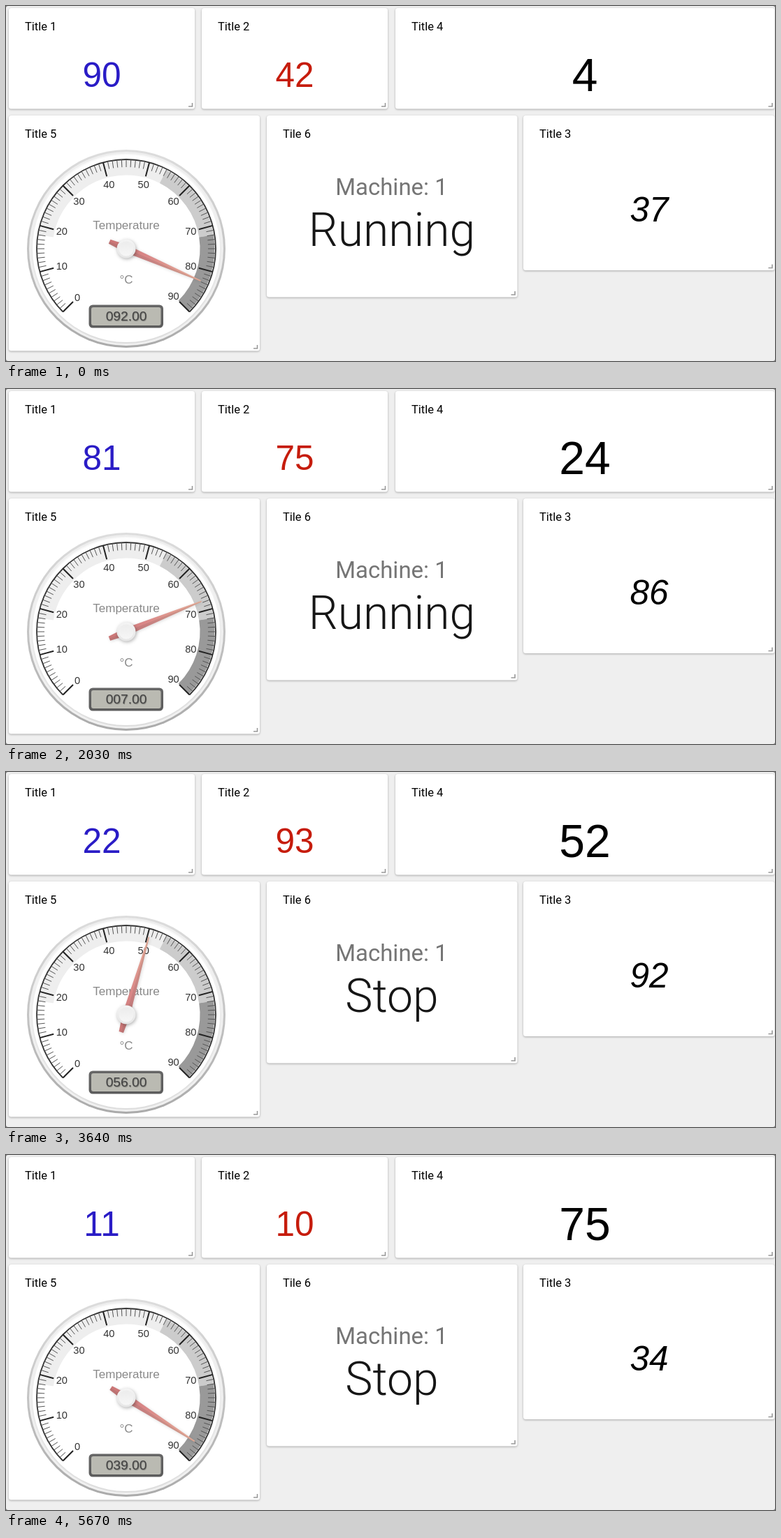
Write an HTML page with a canvas that moves like this. It is 1100 px wide and 509 px high and loops after 5740 ms.

```html
<!DOCTYPE html>
<html lang="en">
<head>
<meta charset="utf-8">
<title>Dashboard</title>
<style>
html, body { margin: 0; width: 100%; height: 100%; overflow: hidden; background: #efefef; }
canvas, svg { position: absolute; left: 0; top: 0; width: 1100px; height: 509px; }
text { font-family: Roboto, sans-serif; fill: #000; }
.title { font-size: 16.5px; }
.value { font-family: "Liberation Sans", Arial, sans-serif; font-size: 49.5px; text-anchor: middle; }
.state { font-size: 66px; font-weight: 300; text-anchor: middle; fill: #161616; }
.machine { font-size: 33px; text-anchor: middle; fill: #757575; }
</style>
</head>
<body>
<canvas id="stage" width="1100" height="509"></canvas>
<svg id="texts" viewBox="0 0 1100 509"></svg>
<script>
const LOOP = 5740, STEP = 70, SWING = 500;
const CX = 172, CY = 348, RAD = Math.PI / 180;
const ctx = document.getElementById('stage').getContext('2d');
const svg = document.getElementById('texts');

// x, y, width, height, title
const cards = [
  [4, 3, 266, 144.5, 'Title 1'],
  [280, 3, 266, 144.5, 'Title 2'],
  [557, 3, 542.5, 144.5, 'Title 4'],
  [4, 157, 359, 337.5, 'Title 5'],
  [373, 157, 358.5, 260.5, 'Tile 6'],
  [740, 157, 359.5, 222, 'Title 3']
];

// start time, blue, red, large, slanted, machine state, temperature
const updates = [
  [-SWING, 90, 42, 4, 37, 'Running', 92],
  [350, 5, 14, 43, 92, 'Idle', 77],
  [1916, 81, 75, 24, 86, 'Running', 7],
  [3025, 22, 93, 52, 92, 'Stop', 56],
  [4038, 1, 10, 46, 17, 'Idle', 96],
  [5598, 11, 10, 75, 34, 'Stop', 39]
];

function addText(cls, x, y, text, style = '') {
  const el = document.createElementNS('http://www.w3.org/2000/svg', 'text');
  el.setAttribute('class', cls);
  el.setAttribute('x', x);
  el.setAttribute('y', y);
  el.setAttribute('style', style);
  el.textContent = text;
  svg.append(el);
  return el;
}

for (const [x, y, , , title] of cards) addText('title', x + 23, y + 32, title);
addText('machine', 551.5, 271, 'Machine: 1');
const fields = [
  addText('value', 137, 115.5, '', 'fill:#2a1cc6'),
  addText('value', 413, 115.5, '', 'fill:#c61c0c'),
  addText('value', 828, 121.5, '', 'font-size:66px'),
  addText('value', 920, 308.5, '', 'font-style:italic'),
  addText('state', 552, 343.5, '')
];

function layer() {
  const c = document.createElement('canvas');
  c.width = 1100;
  c.height = 509;
  return c;
}

function shadow(g, color, blur, dx, dy) {
  g.shadowColor = color;
  g.shadowBlur = blur;
  g.shadowOffsetX = dx;
  g.shadowOffsetY = dy;
}

function noShadow(g) { shadow(g, 'transparent', 0, 0, 0); }

function vertical(g, y0, y1, a, b) {
  const grad = g.createLinearGradient(0, y0, 0, y1);
  grad.addColorStop(0, a);
  grad.addColorStop(1, b);
  return grad;
}

function box(g, x, y, w, h, r, fill) {
  g.fillStyle = fill;
  g.beginPath();
  g.roundRect(x, y, w, h, r);
  g.fill();
}

function disc(g, r, top, bottom) {
  g.fillStyle = vertical(g, CY - r, CY + r, top, bottom);
  g.beginPath();
  g.arc(CX, CY, r, 0, 7);
  g.fill();
}

// angle in degrees, clockwise from the top
function polar(deg, r) {
  return [CX + r * Math.sin(deg * RAD), CY - r * Math.cos(deg * RAD)];
}

function arc(g, r, from, to, width, color) {
  g.strokeStyle = color;
  g.lineWidth = width;
  g.beginPath();
  g.arc(CX, CY, r, (from - 90) * RAD, (to - 90) * RAD);
  g.stroke();
}

function label(g, text, x, y, size, color) {
  g.font = size + 'px "Liberation Sans", Arial, sans-serif';
  g.fillStyle = color;
  g.textAlign = 'center';
  g.fillText(text, x, y);
}

function drawCard(g, [x, y, w, h]) {
  shadow(g, 'rgba(0,0,0,.3)', 3, 0, 1);
  box(g, x, y, w, h, 3.5, '#fff');
  noShadow(g);
  g.strokeStyle = '#999';
  g.lineWidth = 1.6;
  g.beginPath();
  g.moveTo(x + w - 3.5, y + h - 8.5);
  g.lineTo(x + w - 3.5, y + h - 3.5);
  g.lineTo(x + w - 9, y + h - 3.5);
  g.stroke();
}

function drawDial(g) {
  disc(g, 142, '#ddd', '#aaa');
  disc(g, 139, '#eee', '#f0f0f0');
  disc(g, 136, '#fafafa', '#ddd');
  disc(g, 134, '#fff', '#fff');

  arc(g, 116, -81, 27, 21, '#eee');
  arc(g, 116, 27, 81, 21, '#ccc');
  arc(g, 116, 81, 135, 21, '#999');
  arc(g, 128, -135, 135, 1.8, '#333');

  for (let v = 0; v <= 90; v++) {
    const deg = v * 3 - 135, major = v % 10 === 0;
    g.strokeStyle = major ? '#222' : '#555';
    g.lineWidth = major ? 2 : 1;
    g.beginPath();
    g.moveTo(...polar(deg, 128));
    g.lineTo(...polar(deg, major ? 107.5 : 117));
    g.stroke();
    if (major) {
      const [x, y] = polar(deg, v ? 95.5 : 99);
      label(g, v, x, y + 5, 14.6, '#333');
    }
  }
  label(g, 'Temperature', CX, 319.5, 17, '#888');
  label(g, '°C', CX, 398, 17, '#888');

  box(g, 118.5, 428.5, 106.5, 33, 5.5, vertical(g, 428, 461, '#666', '#5c5c5c'));
  box(g, 122, 432, 99.5, 26, 3, '#babab2');
}

function shape(points) {
  ctx.beginPath();
  for (const [x, y] of points) ctx.lineTo(x, y);
  ctx.closePath();
  ctx.fill();
}

function drawNeedle(value) {
  ctx.save();
  ctx.translate(CX, CY);
  ctx.rotate((value * 2.7 - 135) * RAD);
  const grad = ctx.createLinearGradient(0, 26, 0, -116);
  grad.addColorStop(0, '#cb7676');
  grad.addColorStop(0.4, '#d98787');
  grad.addColorStop(1, '#e6ad98');
  ctx.fillStyle = grad;
  shadow(ctx, 'rgba(0,0,0,.15)', 4, 1, 1);
  shape([[-3.3, 26], [-5.5, 0], [-0.8, -116], [0.8, -116], [5.5, 0], [3.3, 26]]);
  noShadow(ctx);
  ctx.fillStyle = 'rgba(110,90,90,.17)';
  shape([[0, 26], [0, -116], [0.8, -116], [5.5, 0], [3.3, 26]]);
  ctx.restore();

  shadow(ctx, 'rgba(0,0,0,.3)', 5, 1, 1.5);
  disc(ctx, 13.5, '#f4f4f4', '#e6e6e6');
  noShadow(ctx);
  disc(ctx, 10.5, '#ececec', '#f6f6f6');
}

const backdrop = layer();
{
  const g = backdrop.getContext('2d');
  g.fillStyle = '#777';
  g.fillRect(0, 0, 1100, 509);
  box(g, 0, 0, 1100, 509, 3, '#efefef');
  for (const card of cards) drawCard(g, card);
  drawDial(g);
}

const ease = p => 1 - Math.sqrt(1 - p * p);

function render(t) {
  let i = updates.length - 1;
  while (i > 0 && updates[i][0] > t) i--;
  const now = updates[i], before = updates[Math.max(0, i - 1)];
  fields.forEach((el, k) => { el.textContent = now[k + 1]; });

  const p = Math.min(1, (t - now[0]) / SWING);
  ctx.drawImage(backdrop, 0, 0);
  shadow(ctx, 'rgba(0,0,0,.35)', 1, 0.7, 0.7);
  label(ctx, String(now[6]).padStart(3, '0') + '.00', CX, 451, 19.2, '#444');
  noShadow(ctx);
  drawNeedle(before[6] + (now[6] - before[6]) * ease(p));
}

const start = performance.now();
function tick() {
  const t = Math.max(0, performance.now() - start) % LOOP;
  render(Math.floor(t / STEP) * STEP);
  requestAnimationFrame(tick);
}
tick();
</script>
</body>
</html>
```
